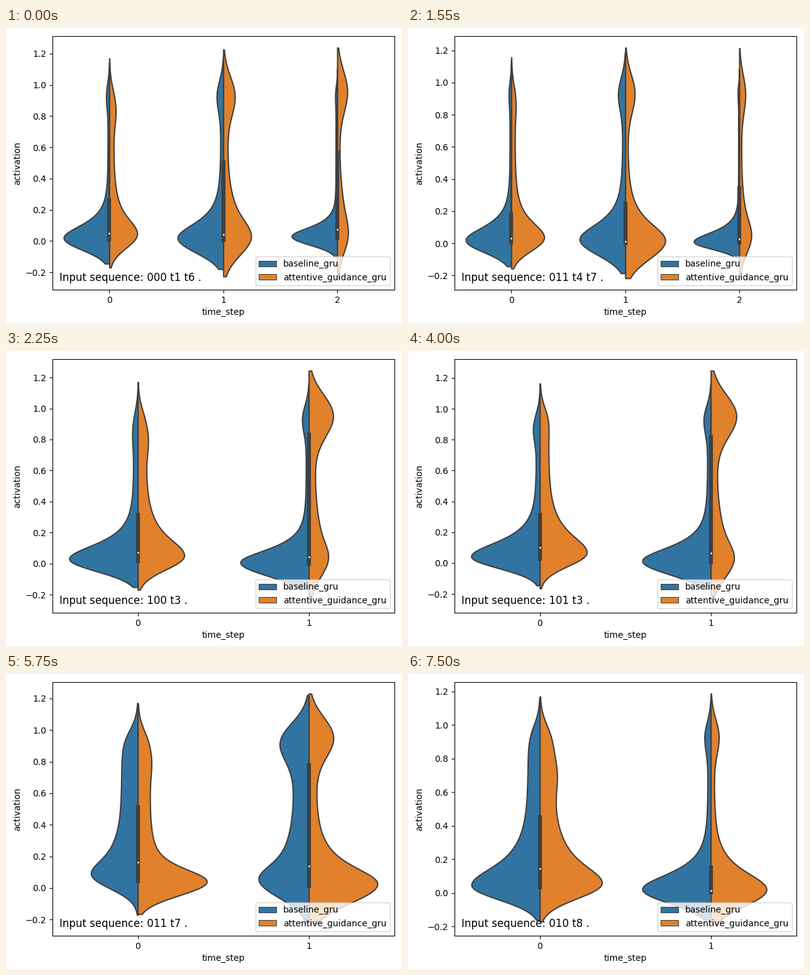
Write a matplotlib script that moves like this. It is 630 px wide and 470 px high and loops after 8000 ms.

```python
import numpy as np
import matplotlib.pyplot as plt
from matplotlib.animation import FuncAnimation
from matplotlib.patches import Patch

W, H = 630, 470
LEFT, TOP, AX_W, AX_H = 73.7, 13.05, 544, 404
BLUE, ORANGE, GRAY = "#3274a1", "#e1812c", "#3f3f3f"
LW = 1.5
STEP = 250
starts = [0, 500, 2250, 4000, 5750, 7500]


def step(x):
    return 1 / (1 + np.exp(-x))


def half(bw, center, peak, fall, mid, bump, at=0.94):
    """Smoothed density of values in 0..1 as widths in pixels.

    A bulge near 0 falls off slowly upwards into a plateau, with a bump near 1.
    """
    y = np.linspace(-2 * bw, 1 + 2 * bw, 100)
    d = y - center
    bulge = np.where(d < 0, np.exp(-0.5 * (d / (1.05 * bw)) ** 2), 1 / np.cosh(d / fall))
    plateau = step((y - 0.2) / 0.06) * step((1 - y) / (0.6 * bw))
    top = np.exp(-0.5 * ((y - at) / (1.1 * bw)) ** 2)
    return y, peak * bulge + mid * plateau + bump * top


# Per category: quartiles, left half, right half.
three_a = [
    ((0.01, 0.05, 0.263),
     half(0.0725, 0.02, 72.5, 0.078, 2.5, 3), half(0.085, 0.045, 44, 0.1, 6.5, 4, 0.84)),
    ((0.006, 0.04, 0.505),
     half(0.09, 0.02, 72.5, 0.091, 4.5, 7), half(0.1133, 0.03, 44, 0.12, 6, 14)),
    ((0.018, 0.074, 0.565),
     half(0.052, 0.03, 72.5, 0.055, 2.5, 1), half(0.1192, 0.05, 17, 0.14, 3, 14, 0.967)),
]
three_b = [
    ((0.005, 0.032, 0.181),
     half(0.0715, 0.02, 72.5, 0.078, 2.5, 2), half(0.0785, 0.036, 52, 0.093, 5.5, 2, 0.87)),
    ((0.0, 0.013, 0.247),
     half(0.093, 0.025, 72.5, 0.093, 4.5, 8), half(0.1085, 0.017, 63.5, 0.105, 3.5, 12.5)),
    ((0.005, 0.028, 0.345),
     half(0.043, 0.01, 72.5, 0.056, 1.5, 1), half(0.107, 0.05, 19, 0.11, 3, 7.5)),
]
two_a = [
    ((0.014, 0.071, 0.314),
     half(0.076, 0.03, 108.8, 0.089, 7, 2, 0.84), half(0.085, 0.05, 73, 0.11, 12.5, 4, 0.8)),
    ((0.0, 0.0425, 0.832),
     half(0.082, 0.007, 108.8, 0.078, 4.5, 7), half(0.1216, 0.04, 30.5, 0.125, 9, 33, 0.965)),
]
two_b = [
    ((0.028, 0.1, 0.313),
     half(0.072, 0.043, 108.8, 0.09, 6, 5, 0.87), half(0.082, 0.067, 73.5, 0.11, 13.5, 2)),
    ((0.005, 0.065, 0.817),
     half(0.083, 0.014, 108.8, 0.085, 5.5, 7), half(0.1234, 0.033, 36.5, 0.125, 9, 35, 0.965)),
]
two_c = [
    ((0.044, 0.164, 0.513),
     half(0.085, 0.085, 71, 0.1, 26, 0), half(0.0823, 0.04, 108.8, 0.083, 19, 3, 0.8)),
    ((0.013, 0.14, 0.779),
     half(0.11, 0.054, 78, 0.105, 24, 28), half(0.1146, 0.025, 108.8, 0.108, 11, 32, 0.966)),
]
two_d = [
    ((0.034, 0.146, 0.4525),
     half(0.081, 0.045, 107.5, 0.11, 19, 0), half(0.085, 0.056, 97, 0.112, 22, 5, 0.7)),
    ((0.004, 0.015, 0.153),
     half(0.08, 0.022, 108.8, 0.088, 5, 6), half(0.0934, 0.02, 88.5, 0.1, 5, 9)),
]
scenes = [("000 t1 t6 .", three_a), ("011 t4 t7 .", three_b), ("100 t3 .", two_a),
          ("101 t3 .", two_b), ("011 t7 .", two_c), ("010 t8 .", two_d)]

fig = plt.figure(figsize=(W / 100, H / 100), dpi=100)
ax = fig.add_axes([LEFT / W, 1 - (TOP + AX_H) / H, AX_W / W, AX_H / H])


def draw_violin(x, per_px, quartiles, left, right):
    for (y, width), side, color in ((left, -1, BLUE), (right, 1, ORANGE)):
        ax.fill_betweenx(y, x, x + side * width * per_px, facecolor=color,
                         edgecolor=GRAY, linewidth=LW)
    q1, median, q3 = quartiles
    ax.plot([x, x], [0, min(1, q3 + 1.5 * (q3 - q1))], color=GRAY, lw=LW)
    ax.plot([x, x], [q1, q3], color=GRAY, lw=3 * LW)
    ax.scatter(x, median, s=(2 * LW) ** 2, color="white", edgecolor=GRAY, zorder=3)


def draw(frame):
    index = np.searchsorted(starts, frame * STEP, side="right") - 1
    caption, violins = scenes[index]
    count = len(violins)
    ax.clear()
    for x, violin in enumerate(violins):
        draw_violin(x, count / AX_W, *violin)
    ax.set_xticks(range(count))
    ax.set_yticks(np.arange(-1, 7) / 5)
    ax.set_xlim(-0.5, count - 0.5)
    low = min(y[0] for _, *halves in violins for y, _ in halves)
    high = 1 - low
    margin = 0.05 * (high - low)
    ax.set_ylim(low - margin, high + margin)
    ax.set_xlabel("time_step")
    ax.set_ylabel("activation")
    ax.text(0.02, 0.0356, "Input sequence: " + caption, fontsize=12,
            transform=ax.transAxes)
    ax.legend(handles=[Patch(facecolor=c, edgecolor=GRAY, linewidth=LW / 2, label=name)
                       for c, name in ((BLUE, "baseline_gru"),
                                       (ORANGE, "attentive_guidance_gru"))],
              loc="lower right")


anim = FuncAnimation(fig, draw, frames=8000 // STEP, interval=STEP,
                     repeat=True, repeat_delay=0)
plt.show()
```
